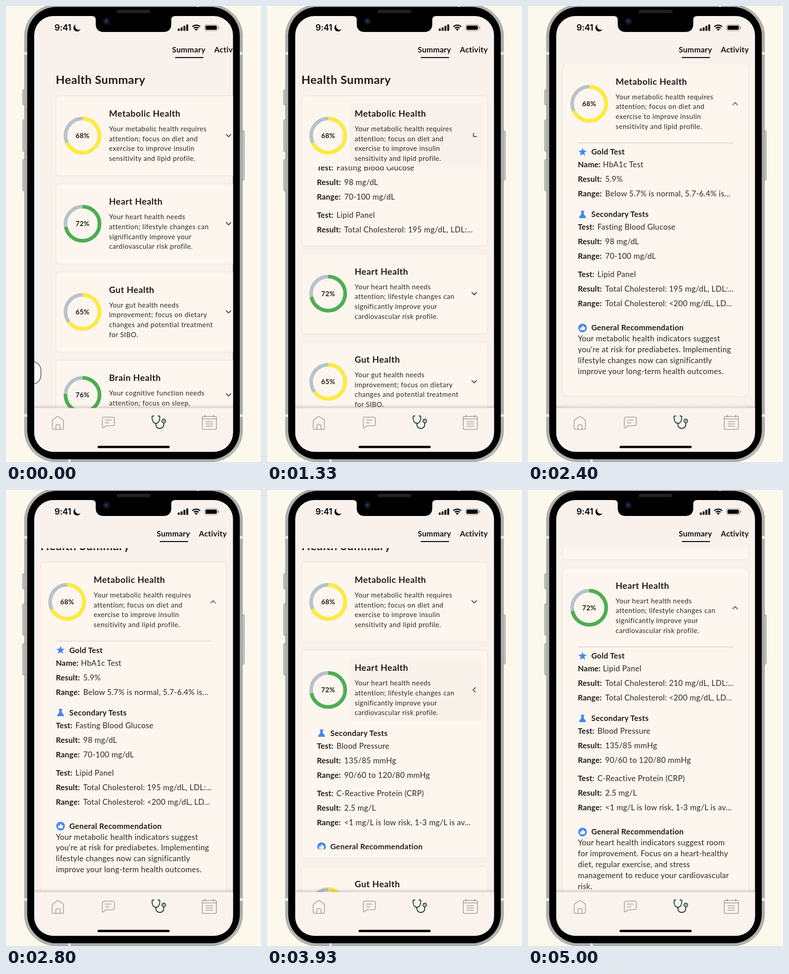
Recreate the animation shown at these times as an HTML page. Size 560x1001 px, loop 5.07 s.

```html
<!DOCTYPE html>
<html lang="en">
<head>
<meta charset="utf-8">
<title>Health Summary</title>
<style>
html, body { margin: 0; width: 100%; height: 100%; overflow: hidden; background: #fcf8ec; }
svg { display: block; }
text { font-family: Lato, "Open Sans", sans-serif; fill: #1f1b18; white-space: pre; }
.h1 { font-size: 25.6px; font-weight: 700; letter-spacing: .5px; }
.tab { font-size: 17px; font-weight: 700; letter-spacing: .3px; fill: #111; }
.title { font-size: 19.3px; font-weight: 700; letter-spacing: .55px; }
.body { font-size: 15px; letter-spacing: .5px; fill: #2d2825; }
.pct { font-size: 15px; font-weight: 700; letter-spacing: .3px; text-anchor: middle; }
.sec { font-size: 17px; font-weight: 700; letter-spacing: .33px; }
.label { font-size: 17px; font-weight: 700; letter-spacing: .2px; }
.value { font-size: 17px; letter-spacing: .31px; fill: #2d2825; }
.clock { font: 600 18.6px Inter, sans-serif; letter-spacing: -.2px; fill: #000; }
.line { fill: none; stroke-linecap: round; stroke-linejoin: round; }
</style>
</head>
<body>
<script>
const LOOP = 5070;
const PANEL_TOP = 156, GAP = 17.4, LIST_TOP = 128;
const BLUE = '#4285f4', YELLOW = '#ffeb3b', GREEN = '#4caf50';

function el(parent, tag, attrs = {}, text) {
  const node = document.createElementNS('http://www.w3.org/2000/svg', tag);
  for (const k in attrs) node.setAttribute(k, attrs[k]);
  if (text !== undefined) node.textContent = text;
  parent.append(node);
  return node;
}
const write = (p, cls, x, y, s) => el(p, 'text', { class: cls, x, y }, s);
const box = (p, x, y, width, height, fill, rx = 0, more = {}) =>
  el(p, 'rect', { x, y, width, height, fill, rx, ...more });
const line = (p, d, stroke, width) =>
  el(p, 'path', { class: 'line', d, stroke, 'stroke-width': width });
const shift = (node, x, y) => node.setAttribute('transform', `translate(${x} ${y})`);

const svg = el(document.body, 'svg', { width: 560, height: 1001, viewBox: '0 0 560 1001' });
const defs = el(svg, 'defs');
function gradient(id, dir, stops) {
  const g = el(defs, 'linearGradient', { id, x1: 0, y1: 0, x2: dir === 'x' ? 1 : 0, y2: dir === 'y' ? 1 : 0 });
  for (const [offset, color, opacity = 1] of stops)
    el(g, 'stop', { offset, 'stop-color': color, 'stop-opacity': opacity });
}
gradient('shade', 'y', [[0, '#554a44', 0], [1, '#554a44', .24]]);
gradient('metal', 'x', [[0, '#8b8b88'], [.5, '#f1f1ee'], [1, '#a5a5a1']]);
const clip = el(defs, 'clipPath', { id: 'screen' });
box(clip, 62, 22, 436.5, 956.5, '#000', 42);

// Phone body
for (const [x, y, h] of [[37, 184, 33], [37, 250, 69], [37, 337, 69], [518.5, 274, 108]])
  box(svg, x, y, 4.5, h, 'url(#metal)', 1.5, { stroke: '#555', 'stroke-width': .8 });
box(svg, 41, -2, 478, 1002, '#d8d8d5', 68, { stroke: '#5c5c5a', 'stroke-width': 1 });
box(svg, 43.5, 0, 473, 997.5, '#b9b9b6', 66, { stroke: '#858582', 'stroke-width': 1 });
for (const y of [101, 896]) for (const x of [40.5, 513]) box(svg, x, y, 6.5, 6, '#ececea');
box(svg, 419, -1, 5, 6, '#ececea');
box(svg, 137, 994, 5, 7, '#ececea');
box(svg, 46.5, 2, 467, 993, '#000', 64);

const screen = el(svg, 'g', { 'clip-path': 'url(#screen)' });
box(screen, 62, 22, 437, 957, '#f9f1ec');
const page = el(screen, 'g');

// Header
write(page, 'tab', 331, 102, 'Summary');
write(page, 'tab', 423.5, 102, 'Activity');
box(page, 337.5, 112, 62.5, 2.2, '#111', 1);
box(page, 1, 780, 42, 50.5, '#fdf8f3', 20, { stroke: '#1b3d33', 'stroke-width': 1.3 });

// Scrolling list
const view = el(page, 'svg', { x: 62, y: LIST_TOP, width: 440, height: 756, viewBox: `62 ${LIST_TOP} 440 756` });
const list = el(view, 'g');
write(list, 'h1', 75.5, 171, 'Health Summary');

const CARDS = [
  { name: 'Metabolic Health', pct: 68, color: YELLOW, h: 176, full: 554,
    text: ['Your metabolic health requires', 'attention; focus on diet and', 'exercise to improve insulin', 'sensitivity and lipid profile.'],
    rows: ['Name:HbA1c Test', 'Result:5.9%', 'Range:Below 5.7% is normal, 5.7-6.4% is...',
      'Test:Fasting Blood Glucose', 'Result:98 mg/dL', 'Range:70-100 mg/dL',
      'Test:Lipid Panel', 'Result:Total Cholesterol: 195 mg/dL, LDL:...', 'Range:Total Cholesterol: <200 mg/dL, LD...'],
    advice: ['Your metabolic health indicators suggest', "you're at risk for prediabetes. Implementing", 'lifestyle changes now can significantly', 'improve your long-term health outcomes.'] },
  { name: 'Heart Health', pct: 72, color: GREEN, h: 176, full: 578,
    text: ['Your heart health needs', 'attention; lifestyle changes can', 'significantly improve your', 'cardiovascular risk profile.'],
    rows: ['Name:Lipid Panel', 'Result:Total Cholesterol: 210 mg/dL, LDL:...', 'Range:Total Cholesterol: <200 mg/dL, LD...',
      'Test:Blood Pressure', 'Result:135/85 mmHg', 'Range:90/60 to 120/80 mmHg',
      'Test:C-Reactive Protein (CRP)', 'Result:2.5 mg/L', 'Range:<1 mg/L is low risk, 1-3 mg/L is av...'],
    advice: ['Your heart health indicators suggest room', 'for improvement. Focus on a heart-healthy', 'diet, regular exercise, and stress', 'management to reduce your cardiovascular', 'risk.'] },
  { name: 'Gut Health', pct: 65, color: YELLOW, h: 176,
    text: ['Your gut health needs', 'improvement; focus on dietary', 'changes and potential treatment', 'for SIBO.'] },
  { name: 'Brain Health', pct: 76, color: GREEN, h: 154,
    text: ['Your cognitive function needs', 'attention; focus on sleep,', 'exercise, and mental stimulation.'] },
];
const VALUE_X = { Name: 164.5, Result: 169.5, Range: 169.5, Test: 152.5 };
const ROW_Y = [222, 254, 286, 359, 391, 423, 463, 495, 527];

function star(p, x, y) {
  let d = '';
  for (let i = 0; i < 10; i++) {
    const a = i * Math.PI / 5, r = i % 2 ? 4 : 9.8;
    d += `${i ? 'L' : 'M'}${x + r * Math.sin(a)} ${y - r * Math.cos(a)}`;
  }
  el(p, 'path', { d: d + 'Z', fill: BLUE });
}
function flask(p, x, y) {
  el(p, 'path', { fill: BLUE, d: `M${x - 4} ${y - 8}h8v2h-1.4v5l4.8 7q.9 2-1.4 2h-12q-2.300 0-1.400-2l4.800-7v-5h-1.400z` });
}
function thumb(p, x, y) {
  el(p, 'circle', { cx: x, cy: y, r: 9.5, fill: BLUE });
  el(p, 'path', { fill: '#fff', d: `M${x - 5.5} ${y - 1}h2v6h-2zM${x - 2.700} ${y - 1}l3.500-4.800q1.500 0 1.200 1.800l-.4 2h3.200q1.300 0 1 1.500l-1.200 4.500q-.3 1-1.300 1h-5q-1 0-1-1z` });
}

// Panel content is laid out from the top edge of its card
function buildPanel(parent, card) {
  card.clip = el(parent, 'svg', { x: 77, y: PANEL_TOP, width: 407, height: 0 });
  const g = card.panel = el(card.clip, 'g');
  const inner = el(g, 'g', { transform: `translate(-77 ${-PANEL_TOP})` });
  box(inner, 109.5, 173.7, 341, 1.1, '#cfc8c3');
  star(inner, 119.8, 194.3);
  flask(inner, 119.8, 331);
  thumb(inner, 119.8, 580.3);
  write(inner, 'sec', 139, 200, 'Gold Test');
  write(inner, 'sec', 139, 337, 'Secondary Tests');
  write(inner, 'sec', 139, 586, 'General Recommendation');
  card.rows.forEach((row, i) => {
    const cut = row.indexOf(':'), key = row.slice(0, cut);
    write(inner, 'label', 109.5, ROW_Y[i] + 6, key + ':');
    write(inner, 'value', VALUE_X[key], ROW_Y[i] + 6, row.slice(cut + 1));
  });
  card.advice.forEach((s, i) => write(inner, 'value', 109.5, 610 + i * 23.8, s));
}

for (const card of CARDS) {
  const g = card.node = el(list, 'g'), mid = card.h / 2;
  card.frame = box(g, 75.8, .5, 408.7, card.h, '#fdf6ef', 10, { stroke: '#e8dfd9', 'stroke-width': 1 });
  card.ink = box(g, 182, 17, 288, 139, '#6d6660', 6, { opacity: 0 });
  const ring = { cx: 134.3, cy: mid, r: 37.4, fill: 'none', 'stroke-width': 8 };
  el(g, 'circle', { ...ring, stroke: '#b7c3c9' });
  el(g, 'circle', { ...ring, stroke: card.color, pathLength: 100,
    'stroke-dasharray': `${card.pct} 100`, transform: `rotate(-90 134.3 ${mid})` });
  write(g, 'pct', 134.3, mid + 5.3, card.pct + '%');
  write(g, 'title', 192.5, 46.3, card.name);
  card.text.forEach((s, i) => write(g, 'body', 192.5, 78.3 + i * 21.7, s));
  card.arrow = line(g, 'M-5-2.6L0 2.600L5-2.600', '#4b403a', 2);
  if (card.full) buildPanel(g, card);
}

// Bottom bar
box(screen, 62, 875, 437, 8, 'url(#shade)');
box(screen, 62, 882.5, 437, 97, '#faf2ed');
const GREY = '#a29b96', DARK = '#12352a';
line(screen, 'M101.500 911.500q0-2 1.600-3.300l8.800-6.300q2-1.300 4 0l8.800 6.300q1.600 1.300 1.600 3.300v14.500q0 3.500-3.500 3.500h-17.800q-3.500 0-3.500-3.500zM109.500 929v-7q0-3 3-3h3.200q3 0 3 3v7', GREY, 1.6);
line(screen, 'M215 902.500h19q4 0 4 4v11q0 4-4 4h-14.500l-5.500 4.300q-2.500 1-2.500-2v-17.300q0-4 3.500-4zM218 909h13M218 915h8', GREY, 1.6);
line(screen, 'M324.500 900h-1.500q-2.300 0-2.300 2.300c0 8 3 13.700 8.500 13.700s8.500-5.700 8.500-13.700q0-2.300-2.300-2.300h-1.500M329.200 916v3c0 5 3.500 8.300 8.600 8.300s8.600-3.500 8.600-8.300v-3.500', DARK, 2);
el(screen, 'circle', { cx: 346.5, cy: 911, r: 4, fill: 'none', stroke: DARK, 'stroke-width': 1.8 });
el(screen, 'circle', { cx: 346.5, cy: 911, r: 1.3, fill: DARK });
line(screen, 'M433.500 901h26q2.500 0 2.500 2.500v23.500q0 2.500-2.500 2.500h-26q-2.500 0-2.500-2.500v-23.500q0-2.500 2.500-2.500zM431 906.500h31M437 898v5M456 898v5M439 912.500h15M439 917.500h15M439 922.500h15', GREY, 1.6);
box(screen, 201, 965.5, 158.5, 5, '#000', 2.5);

// Status bar
write(screen, 'clock', 106.5, 54.3, '9:41');
el(screen, 'path', { d: 'M153 40.500a8 8 0 1 0 10.500 10.500a7.600 7.600 0 0 1-10.500-10.500z' });
[5, 7.5, 11, 14.2].forEach((h, i) => box(screen, 377.3 + i * 6.2, 54.6 - h, 4.2, h, '#000', 1.2));
for (const r of [12, 7.4]) {
  const k = r * .707;
  el(screen, 'path', { d: `M${417.8 - k} ${54 - k}A${r} ${r} 0 0 1 ${417.8 + k} ${54 - k}`, fill: 'none', stroke: '#000', 'stroke-width': 2.7 });
}
el(screen, 'path', { d: 'M417.800 54.500l-3.200-3.500q3.200-2.600 6.400 0z' });
box(screen, 436.3, 41, 28.5, 13.2, 'none', 4, { stroke: '#8d8885', 'stroke-width': 1.1 });
box(screen, 438.2, 42.9, 24.7, 9.4, '#000', 2.5);
box(screen, 466, 45.5, 2, 4.4, '#8d8885', 1);

// Notch
el(svg, 'path', { d: 'M188 20v2q9 0 9 8v9q0 18 18 18h130q18 0 18-18v-9q0-8 9-8v-2z' });
box(svg, 243, 9, 74, 6, '#1c1c1c', 3, { stroke: '#343434', 'stroke-width': .8 });
line(svg, 'M247 12h67', '#3a3a3a', 1.6).setAttribute('stroke-dasharray', '.2 3');
el(svg, 'circle', { cx: 220.5, cy: 33.3, r: 8, fill: '#10131c' });
el(svg, 'circle', { cx: 220.5, cy: 33.3, r: 4.4, fill: '#14254a' });
el(svg, 'circle', { cx: 219.7, cy: 32, r: 1.5, fill: '#2d4f86' });

// Motion: [start, end, from, to]
const SLIDE = [[0, 330, 34, 0]];
const SCROLL = [[1600, 2000, 0, 85], [2350, 2720, 85, 39], [4100, 5000, 39, 219.5]];
const OPEN = [
  [[1237, 1437, 0, 1], [3130, 3330, 1, 0]],
  [[3800, 4000, 0, 1]],
];
const easeOut = p => 1 - (1 - p) ** 2.66;
const linear = p => p;

function track(steps, t, ease) {
  let v = steps[0][2];
  for (const [a, b, from, to] of steps)
    if (t >= a) v = from + (to - from) * ease(Math.min(1, (t - a) / (b - a)));
  return v;
}
const mix = (a, b, p) => Math.round(a + (b - a) * p);

function draw(t) {
  shift(page, track(SLIDE, t, easeOut), 0);
  shift(list, 0, -track(SCROLL, t, easeOut));
  let y = 196.5;
  CARDS.forEach((card, i) => {
    const steps = OPEN[i] || [[0, 1, 0, 0]];
    const open = track(steps, t, linear) ** 1.7;
    const extra = open * (card.full || 0);
    shift(card.node, 0, y);
    card.frame.setAttribute('height', card.h + extra);
    card.arrow.setAttribute('transform', `translate(455 ${card.h / 2}) rotate(${open * 180})`);
    card.arrow.setAttribute('stroke', `rgb(${mix(75, 134, open)},${mix(64, 84, open)},${mix(58, 70, open)})`);
    if (card.full) {
      card.clip.setAttribute('height', extra);
      card.clip.setAttribute('visibility', extra > 0 ? 'visible' : 'hidden');
      shift(card.panel, 0, (extra - card.full) / 2);
    }
    const glow = steps.reduce((m, [a]) => Math.max(m, a > 0 ? 1 - Math.abs(t - a - 60) / 180 : 0), 0);
    card.ink.setAttribute('opacity', glow * .045);
    y += card.h + extra + GAP;
  });
}

const start = performance.now();
function tick() {
  draw((performance.now() - start) % LOOP);
  requestAnimationFrame(tick);
}
draw(0);
requestAnimationFrame(tick);
</script>
</body>
</html>
```
